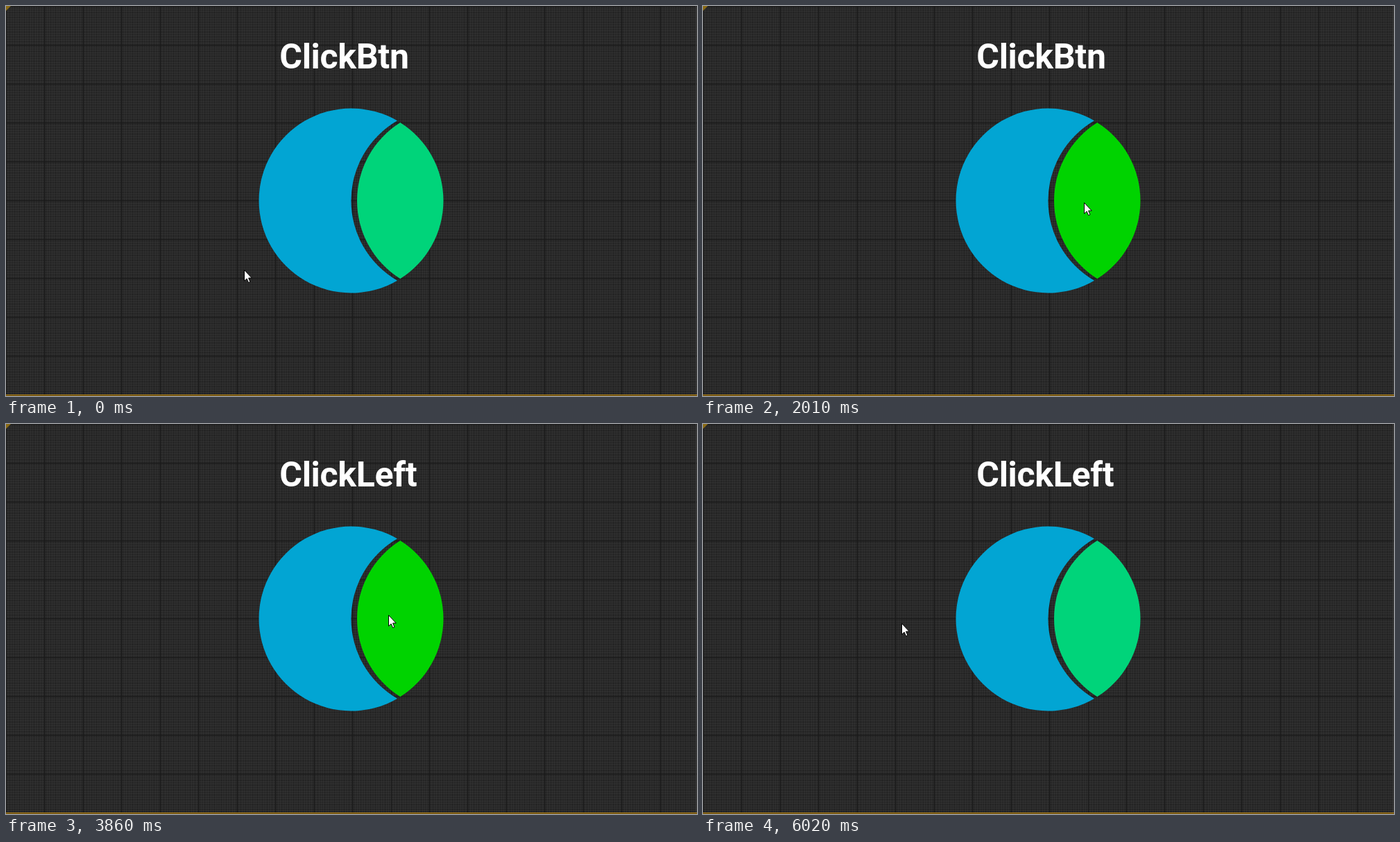
Write an HTML page with a canvas that moves like this. It is 996x562 px and loops after 6270 ms.

```html
<!DOCTYPE html>
<html lang="en">
<head>
<meta charset="utf-8">
<title>Shaped buttons</title>
<style>
  html, body { margin: 0; width: 100%; height: 100%; overflow: hidden; background: #262626; }
  canvas, svg { position: absolute; left: 0; top: 0; width: 996px; height: 562px; }
  text { font: bold 50px Roboto, sans-serif; letter-spacing: -.3px; fill: #fff; }
</style>
</head>
<body>
<canvas id="grid" width="996" height="562"></canvas>
<svg viewBox="0 0 996 562">
  <text id="label" x="394.2" y="90">ClickBtn</text>
  <path id="left" d="M564 165.3A133 133 0 1 0 564 395.7A133 133 0 0 1 564 165.3Z"/>
  <path id="right" d="M568.25 167.9A133 133 0 0 1 568.25 393.1A133 133 0 0 1 568.25 167.9Z"/>
  <path id="cursor" d="M.5 .5V16.2L4.1 12.9L6.6 18.6L9 17.6L6.6 12H11.3Z" fill="#fff" stroke="#000"/>
</svg>
<script>
const W = 996, H = 562, LOOP = 6270, STEP = 75, R = 133, MID = 280.5;
const $ = id => document.getElementById(id);

const home = { x: 343, y: 380 };
const glides = [
  { start: 80, steps: 3, x: 432, y: 288 },
  { start: 690, steps: 3, x: 591, y: 280 },
  { start: 1240, steps: 4, x: 428, y: 285 },
  { start: 1780, steps: 4, x: 549, y: 283 },
  { start: 2930, steps: 5, x: 467, y: 277 },
  { start: 3710, steps: 5, x: 597, y: 274 },
  { start: 4630, steps: 4, x: 397, y: 276 },
  { start: 5720, steps: 5, x: 286, y: 287 }
];
const clicks = [
  { down: 2470, up: 2620, text: "ClickRight" },
  { down: 3390, up: 3540, text: "ClickLeft" },
  { down: 4250, up: 4400, text: "ClickRight" },
  { down: 5090, up: 5170, text: "ClickLeft" }
];
const colors = {
  left: { normal: "#02a5d3", hover: "#0046d4", press: "#00349c" },
  right: { normal: "#00d47a", hover: "#00d300", press: "#009c00" }
};

const smooth = p => p * p * (3 - 2 * p);

// The pointer eases from stop to stop, in whole steps of time.
function pointer(t) {
  let { x, y } = home;
  for (const g of glides) {
    if (t < g.start) break;
    const step = Math.floor((t - g.start) / STEP) + 1;
    const p = smooth(Math.min(1, step / g.steps));
    x += (g.x - x) * p;
    y += (g.y - y) * p;
  }
  return [Math.round(x), Math.round(y)];
}

function hit(x, y) {
  const from = cx => Math.hypot(x - cx, y - MID);
  if (from(497.5) > R) return "";
  if (from(639) < R) return "right";
  return from(630.5) > R + 2 ? "left" : "";
}

function drawGrid() {
  const g = $("grid").getContext("2d");
  const rect = (color, x, y, w, h) => { g.fillStyle = color; g.fillRect(x, y, w, h); };
  const lines = (parts, color) => {
    for (let x = 0; x < W; x += 55.45 / parts) rect(color, Math.round(x), 0, 1, H);
    for (let y = 0; y < H; y += 56 / parts) rect(color, 0, Math.round(y), W, 1);
  };
  rect("#252525", 0, 0, W, H);
  lines(16, "rgba(255,255,255,.04)");
  lines(1, "#191919");
  rect("#3a3a3a", 994, 0, 1, H);
  rect("#c8921a", 0, 560, W, 1);
  rect("#4a3810", 0, 561, W, 1);
  g.fillStyle = "#8a6a14";
  g.beginPath();
  g.moveTo(0, 0);
  g.lineTo(7, 0);
  g.lineTo(0, 7);
  g.fill();
}

function render(t) {
  const [x, y] = pointer(t);
  const over = hit(x, y);
  const down = clicks.some(c => t >= c.down && t < c.up);
  for (const id of ["left", "right"]) {
    const state = over !== id ? "normal" : down ? "press" : "hover";
    $(id).setAttribute("fill", colors[id][state]);
  }
  const last = clicks.filter(c => c.up <= t).pop();
  $("label").textContent = last ? last.text : "ClickBtn";
  $("cursor").setAttribute("transform", `translate(${x} ${y})`);
}

const start = performance.now();
function tick() {
  render((performance.now() - start) % LOOP);
  requestAnimationFrame(tick);
}
drawGrid();
tick();
</script>
</body>
</html>
```
